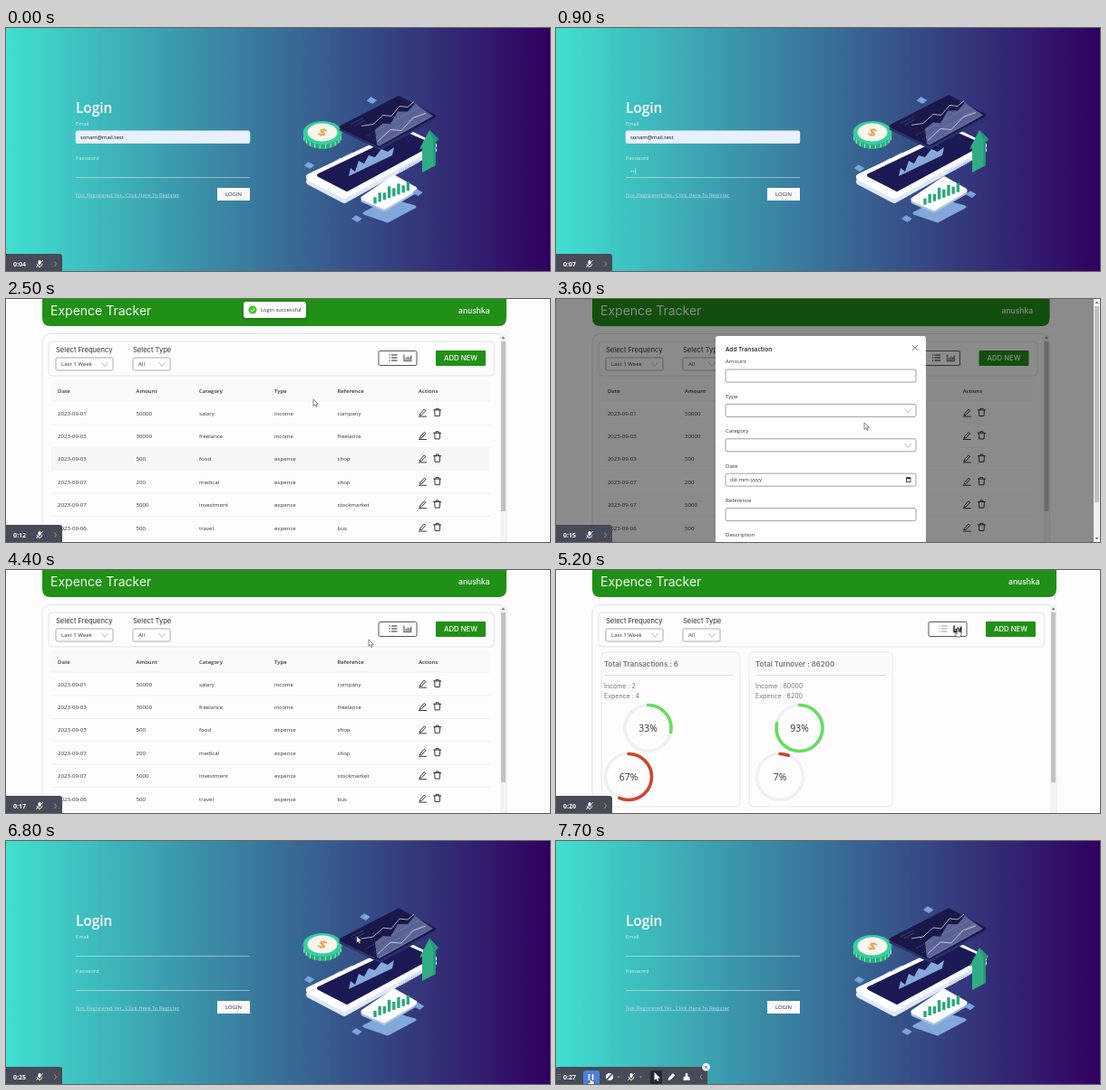
Animation, 600 px wide and 269 px high, one loop 7.8 s. Source, as an HTML page:

```html
<!DOCTYPE html>
<html lang="en">
<head>
<meta charset="utf-8">
<title>Expence Tracker</title>
<style>
html, body { margin: 0; width: 100%; height: 100%; overflow: hidden; }
svg { display: block; width: 100vw; height: 100vh; font-family: 'Open Sans', 'Noto Sans', sans-serif; }
text { white-space: pre; }
.m { font-family: Inter, 'Open Sans', sans-serif; }
</style>
</head>
<body>
<svg id="stage" viewBox="0 0 600 269" preserveAspectRatio="none"></svg>
<script>
const LOOP = 7800, STEP = 100;
const stage = document.getElementById('stage');

// Markup helpers
const text = (x, y, s, size = 6.1, fill = '#333', more = '') =>
  `<text x="${x}" y="${y}" font-size="${size}" fill="${fill}" ${more}>${s}</text>`;
const rect = (x, y, w, h, fill, more = '') =>
  `<rect x="${x}" y="${y}" width="${w}" height="${h}" fill="${fill}" ${more}/>`;
const path = (d, fill, more = '') => `<path d="${d}" fill="${fill}" ${more}/>`;
const line = (d, stroke, width = 1, more = '') =>
  path(d, 'none', `stroke="${stroke}" stroke-width="${width}" ${more}`);
const group = (id, body, more = '') => `<g id="${id}" ${more}>${body}</g>`;
const at = (x, y, body) => `<g transform="translate(${x} ${y})">${body}</g>`;
const range = (n, f) => Array.from({ length: n }, (_, i) => f(i)).join('');
const round = 'stroke-linejoin="round" stroke-linecap="round"';
const mid = 'text-anchor="middle"';
// Filled polygon with rounded corners
const slab = (d, fill, width) => path(d, fill, `stroke="${fill}" stroke-width="${width}" ${round}`);

const tile = id => group(id, slab('M-5 0L-1-3.3L5 0L1 3.3Z', '#7ba5dc', 1));

function artwork() {
  const body = 'M335 165L373 185L471 130L440 115Z';
  const phone =
    at(0, 5, slab(body, '#dfe8f8', 8)) + slab(body, '#fff', 8) +
    slab('M345 163L376 179L468 129L441 117Z', '#1b1a55', 4) +
    path('M378 164L380 155L385 159L389 147L395 150L400 141L407 143L414 134L421 137L428 132L426 141Z', '#86a9dc') +
    line('M434 159L456 147', '#b9cdec', 3, 'stroke-dasharray="1.5 1"') +
    line('M362 148L369 144M372 143L382 138M361 153L366 150', '#b6cbef');
  const screen = 'M369 109L412 130L473 97L433 76Z';
  const panel =
    at(0, 3, slab(screen, '#2b3070', 3)) + slab(screen, '#191848', 3) +
    path('M409 129L407 112L416 105L424 106L432 92L443 92L451 83L471 97L412 130Z', '#8493c4', 'opacity=".62"') +
    line('M392 108L405 106L416 96L425 97L434 86L443 87L450 81M410 125L424 112L436 113L449 99L463 94', '#e6ecff', .7) +
    line('M411 129L468 98M404 124L462 92M397 119L455 88', '#dce8ff', .3, 'stroke-dasharray="1 1.4"') +
    line('M380 106L394 99M384 108L395 102', '#43508f', .7);
  const coin =
    path('M328 116V121A21 13 0 0 0 370 121V116Z', '#27ad7e') +
    range(10, i => {
      const a = .25 + i * .29, x = 349 + 21 * Math.cos(a), y = 117 + 12.5 * Math.sin(a);
      return line(`M${x} ${y}V${y + 4}`, '#b5ead5', 1);
    }) +
    '<ellipse cx="349" cy="116" rx="21.5" ry="13" fill="#36cfa0"/>' +
    '<ellipse cx="349" cy="115.5" rx="16.5" ry="10" fill="#f8f5ec"/>' +
    text(0, 5, '$', 14, '#e3a04a', `${mid} font-weight="700" transform="translate(349 115.5) scale(1.15 .85) rotate(25)"`);
  const face = 'M394 189L417 199L451 179L428 166Z';
  const card =
    at(0, 2.5, slab(face, '#a9c0e4', 5)) + slab(face, '#fff', 5) +
    range(8, i => line(`M${407 + i * 5.2} ${195 - i * 2}v${-[7, 10, 8, 13, 9, 12, 8, 10][i]}`, '#2aa97c', 3.4));
  const arrow =
    path('M467 113L477 123L474 126V152L459 160V133L456 134Z', '#2fae83') +
    path('M467 113L477 123L474 126V152L471.5 153.5V125Z', '#23967a');
  return phone + group('coin', coin) + group('panel', panel) +
    slab('M395 205L423 190L451 198L421 214Z', '#82a8da', 3) +
    group('card', card) + group('arrow', arrow) +
    ['tileA', 'tileB', 'tileC', 'tileD'].map(tile).join('');
}

function login() {
  const pale = 'rgba(255,255,255,.75)';
  const underline = y => line(`M77 ${y}H269`, 'rgba(255,255,255,.55)', .8);
  return rect(0, 0, 600, 269, 'url(#sky)') +
    text(77, 94, 'Login', 15.4, '#fff', 'font-weight="600"') +
    text(77, 107.5, 'Email', 5.7, pale) + underline(127.5) +
    group('filled', rect(76.7, 113.6, 192.6, 14.2, '#e8f0fe', 'rx="3"') + text(82, 123, 'sonam@mail.test', 5.9, '#111')) +
    text(77, 146, 'Password', 5.7, pale) + underline(165.5) +
    group('dots', range(6, i => `<circle cx="${83 + i * 2.6}" cy="158.7" r=".8" fill="#fff" fill-opacity=".85"/>`)) +
    line('M0 155.5V162', '#fff', .6, 'id="caret"') +
    text(77, 186.5, 'Not Registered Yet , Click Here To Register', 5.9, '#b5d9e8', 'text-decoration="underline"') +
    rect(233, 177, 36, 14, '#fafafa') + text(251, 186.3, 'LOGIN', 5.9, '#222', mid) +
    artwork();
}

const chevron = (x, y) => line(`M${x - 3.5} ${y - 2}l3.5 4.5l3.5-4.5`, '#aaa', .8);
const pen = line('M-2.6 1.5L1.7-3.4L3.4-2L-1 2.8L-3 3.2ZM-4 4.6H4', '#222', .9, round);
const bin = line('M-4-2.6H4M-1.5-2.8V-4.2H1.5V-2.8M-3-2.4L-2.6 4H2.6L3-2.4', '#222', .9, round);
const arrowUp = (x, y) => path(`M${x - 2} ${y + 1}h4l-2-2.6Z`, '#777');

// Header and filters; inset is the room taken by the page scrollbar
function frame(inset) {
  const r = x => x - inset, border = 'stroke="#dcdcdc" stroke-width=".8"';
  return rect(0, 0, 600, 269, '#fdfdfd') +
    path(`M40 0H${r(552)}V21Q${r(552)} 30 ${r(543)} 30H49Q40 30 40 21Z`, '#219016') +
    text(49, 18.4, 'Expence Tracker', 14, '#f4fbf2', 'class="m"') +
    text(r(499), 16, 'anushka', 8.6, '#fff', 'class="m" font-weight="500"') +
    rect(40, 38.5, r(512), 250, '#fdfdfd', `rx="9" ${border}`) +
    rect(r(545), 39, 7, 230, '#f3f3f3') + arrowUp(r(548.5), 43) + rect(r(546), 47, 5, 188, '#c1c1c1') +
    rect(47, 47, r(491.5), 38, 'none', `rx="4" ${border}`) +
    text(55, 59, 'Select Frequency', 7.6, '#333', 'class="m"') +
    text(140, 59, 'Select Type', 7.6, '#333', 'class="m"') +
    [[55, 63, 'Last 1 Week'], [140, 41, 'All']].map(([x, w, s]) =>
      rect(x, 65, w, 14, '#fff', 'rx="1.5" stroke="#999" stroke-width=".8"') +
      text(x + 6, 74.2, s) + chevron(x + w - 9, 72)).join('') +
    rect(r(411), 57.5, 42, 16, '#fff', 'rx="1.5" stroke="#444" stroke-width=".9"') +
    rect(r(474), 57, 55, 17, '#219016', 'rx="1"') +
    text(r(501.5), 68.4, 'ADD NEW', 7.7, '#fff', `class="m" font-weight="500" ${mid}`);
}

const toggles = (x, listInk, chartInk) =>
  line(`M${x} 62h1.3M${x} 65h1.3M${x} 68h1.3M${x + 2.6} 62h6.4M${x + 2.6} 65h6.4M${x + 2.6} 68h6.4`, listInk, 1.2) +
  line(`M${x + 16.5} 61.5V68.5H${x + 25}M${x + 18.7} 67.5v-2.5M${x + 20.7} 67.5v-4M${x + 22.7} 67.5v-3M${x + 24.3} 67.5v-5`, chartInk, 1.4);

function list(inset) {
  const heads = ['Date', 'Amount', 'Category', 'Type', 'Reference', 'Actions'];
  const rows = ['01 50000 salary income company', '03 30000 freelance income freelance', '03 500 food expence shop',
    '07 200 medical expence shop', '07 5000 investment expence stockmarket', '06 500 travel expence bus'];
  const col = i => [57, 143.5, 213, 296, 365.5, 455][i] * (1 - inset / 484) + inset * 50 / 484;
  const end = 534 - inset;
  return frame(inset) + toggles(422.5 - inset, '#222', '#777') +
    rect(50, 89, end - 50, 24, '#fafafa') + line(`M50 113H${end}`, '#eee', .7) +
    heads.map((s, i) => text(col(i), 103.5, s, 6, '#333', 'font-weight="600"')).join('') +
    rows.map((row, k) => {
      const y = 126 + k * 25.4;
      const cells = row.split(' ');
      cells[0] = '2023-09-' + cells[0];
      return (k == 2 && !inset ? rect(50, 164.5, end - 50, 25, '#f7f7f7', 'id="hover"') : '') +
        cells.map((s, i) => text(col(i), y + 2.6, s)).join('') +
        at(col(5) + 4.5, y - .5, pen) + at(col(5) + 20.7, y - .5, bin) +
        line(`M50 ${y + 13}H${end}`, '#eee', .7);
    }).join('');
}

const ring = (x, y, p, ink) =>
  `<circle cx="${x}" cy="${y}" r="25.5" fill="none" stroke="#f0f0f2" stroke-width="3.6"/>` +
  `<circle class="ring" data-p="${p}" cx="${x}" cy="${y}" r="25.5" fill="none" stroke="${ink}" stroke-width="3.6"
    stroke-linecap="round" pathLength="100" transform="rotate(-90 ${x} ${y})"/>` +
  text(x, y + 3.8, p + '%', 10.4, '#333', mid);

const summary = (x, w, pad, title, income, expence, p) =>
  rect(x, 91, w, 171, '#fdfdfd', 'rx="4" stroke="#e2e2e2" stroke-width=".8"') +
  rect(x + .5, 91.5, w - 1, 24, '#fafafa', 'rx="3"') +
  text(x + pad, 107, title, 7.9, '#777', 'class="m" font-weight="600"') +
  line(`M${x + pad} 116.5H${x + w - 7}`, '#d5d5d5', .8) +
  text(x + pad, 130.5, 'Income : ' + income, 7, '#777', 'class="m"') +
  text(x + pad, 142.3, 'Expence : ' + expence, 7, '#777', 'class="m"') +
  ring(x + pad + 48.5, 175, p, '#68dc60') + ring(x + pad + 27, 229, 100 - p, '#d0452b');

const charts = () => frame(0) + toggles(422.5, '#999', '#111') +
  summary(50, 153, 3, 'Total Transactions : 6', 2, 4, 33) +
  summary(213, 158, 7, 'Total Turnover : 86200', 80000, 6200, 93);

function dialog() {
  const fields = ['Amount', 'Type', 'Category', 'Date', 'Reference', 'Description'];
  return rect(176, 41, 232, 260, '#fff', 'rx="3"') +
    text(187, 58, 'Add Transaction', 6.6, '#222', 'font-weight="600"') +
    line('M393 51l6 6M399 51l-6 6', '#777', .9) +
    fields.map((s, i) => {
      const y = 78 + i * 38.4;
      return text(187, y - 6.7, s) + rect(187, y, 210, 14, '#fff', 'rx="2" stroke="#888" stroke-width=".8"') +
        (i == 1 || i == 2 ? chevron(388, y + 7) : '');
    }).join('') +
    text(192, 202.3, 'dd-mm-yyyy', 6.1) +
    rect(386.5, 198, 4.5, 4.5, 'none', 'stroke="#222" stroke-width=".8"') + rect(386.5, 197.5, 4.5, 1.7, '#222');
}

const BAR = '#464b57';
const mic = rect(-1.5, -4, 3, 5, '#fff', 'rx="1.5"') +
  line('M-3 0A3 3 0 0 0 3 0M0 3V4.5M-3.8 4L3.8-4', '#fff', .8);
const angle = (x, dir) => line(`M${x - dir} 258.5l${2 * dir} 2.7l${-2 * dir} 2.7`, '#aaa', .8);
const tools = () =>
  rect(0, 250, 167, 22, BAR, 'rx="2"') +
  line('M2.4 258V265M4.4 258V265', '#999', 1, 'stroke-dasharray="1 1.5"') +
  rect(30, 254, 18, 18, '#4a80e0', 'rx="3"') + line('M36.5 258V265M40.5 258V265', '#fff', 1.6) +
  at(59, 261, '<circle r="4" fill="#fff"/>' + line('M-3.6 4L3.6-4', BAR, 1.6)) +
  at(83, 261, mic) +
  [69, 93.5].map(x => path(`M${x - 1.5} 260.5h3l-1.5 2Z`, '#999')).join('') +
  rect(104, 254, 13, 15, '#25282e', 'rx="2"') +
  path('M108.5 256V265L110.6 263L112 266L113.4 265.3L112 262.5H115Z', '#fff') +
  path('M123.5 265L124.3 262L129 257L131.3 259.2L126.5 264.2Z', '#fff') +
  path('M142.8 257h2.4v3.2l2.3 1.5v3.4h-7v-3.4l2.3-1.5Z', '#fff') + angle(160, -1) +
  '<circle cx="165.5" cy="250.3" r="4.3" fill="#fff"/>' + line('M164 248.8l3 3M167 248.8l-3 3', '#333', .8);

stage.innerHTML = `<defs>
  <linearGradient id="sky"><stop stop-color="#40e0d0"/><stop offset="1" stop-color="#300060"/></linearGradient>
  <filter id="soft" x="-30%" y="-60%" width="160%" height="240%"><feDropShadow dx="0" dy="1.5" stdDeviation="2" flood-opacity=".2"/></filter>
  </defs>` +
  group('login', login()) + group('list', list(0)) + group('narrow', list(7.5)) + group('charts', charts()) +
  group('menu', rect(490, 22, 53, 14, '#fff', 'rx="2" filter="url(#soft)"') + text(498, 31.3, 'Logout', 6.1, '#444')) +
  group('toast', rect(262, 3, 69, 18, '#fff', 'rx="3" filter="url(#soft)"') +
    '<circle cx="272" cy="12" r="4.6" fill="#45c932"/>' + line('M269.9 12.1l1.6 1.7l2.8-3.2', '#fff', 1) +
    text(281, 14.3, 'Login successful', 5.9)) +
  group('mask', rect(0, 0, 593, 269, '#000', 'opacity=".45"')) +
  group('pageBar', rect(593, 0, 7, 269, '#f1f1f1') + arrowUp(596.5, 4) + rect(594, 8, 5, 217, '#c1c1c1') +
    path('M594.5 264h4l-2 2.6Z', '#777')) +
  group('dialog', dialog()) +
  group('mini', path('M0 250H59Q62 250 62 253V269H0Z', BAR) + at(37, 261, mic) + angle(54.5, 1)) +
  group('tools', tools()) +
  text(8, 263.6, '', 7, '#fff', 'id="clock" font-weight="700"') +
  group('pointer', path('M0 0V7.4L1.8 5.8L3 8.4L4.2 7.8L3.1 5.3H5.4Z', '#fff', 'stroke="#333" stroke-width=".6"')) +
  group('hand', path('M-.8 0Q0-.9.8 0V3L4 3.8V6.5L3 9H-1.2L-3.2 5.8L-2.3 5L-.8 6Z', '#fff', 'stroke="#222" stroke-width=".6"'));

const $ = id => document.getElementById(id);
const show = (id, on) => $(id).style.opacity = +on;
const move = (id, x, y) => $(id).setAttribute('transform', `translate(${x} ${y})`);
const clamp = v => Math.max(0, Math.min(1, v));
const ease = v => v * v * (3 - 2 * v);
const ramp = (t, from, to) => ease(clamp((t - from) / (to - from)));
const pulse = (t, a, b, c, d) => ramp(t, a, b) - ramp(t, c, d);
const within = (t, a, b) => t >= a && t < b;

// Mouse track: time, x, y
const track = [[1500, 270, 225], [1750, 251, 185], [2000, 251, 185], [2450, 339, 111], [2700, 339, 111],
  [3200, 500, 66], [3400, 500, 66], [3600, 340, 137], [3850, 340, 137], [4100, 396, 54], [4200, 396, 54],
  [4400, 400, 77], [4800, 443, 65], [5300, 443, 65], [5800, 519, 16], [6000, 519, 16], [6300, 508, 29],
  [6550, 508, 29], [7000, 300, 160], [7500, 38, 262], [7800, 38, 262]];

function mouse(t) {
  const i = Math.max(1, track.findIndex(p => p[0] > t));
  const [t0, x0, y0] = track[i - 1], [t1, x1, y1] = track[i];
  const k = ramp(t, t0, t1);
  return [x0 + (x1 - x0) * k, y0 + (y1 - y0) * k];
}

function draw(t) {
  const inApp = within(t, 2000, 6700);
  const modal = pulse(t, 3300, 3500, 4100, 4300);
  show('login', !inApp);
  show('list', inApp && t < 5000 && !modal);
  show('narrow', modal > 0);
  show('charts', inApp && t >= 5000);

  // Login form and floating artwork
  show('filled', t < 2000);
  const typed = t < 2000 ? Math.max(0, Math.min(6, Math.floor((t - 660) / 120))) : 0;
  [...$('dots').children].forEach((dot, i) => dot.style.opacity = +(i < typed));
  show('caret', within(t, 600, 1700) && t % 400 < 200);
  move('caret', 82.5 + typed * 2.6, 0);
  const a = t * 2 * Math.PI / 1800, s = Math.sin(a), c = Math.cos(a);
  move('coin', 0, s);
  move('panel', 0, .5 * c);
  move('card', 0, -.7 * c);
  move('arrow', 0, 5 * s);
  move('tileA', 403.5 + 7.5 * s, 80 - 4 * s);
  move('tileB', 334.5, 153.5 - 1.5 * c);
  move('tileC', 387, 211);
  move('tileD', 456 - 2 * c, 183 - c);

  // Dashboard
  show('hover', 1 - ramp(t, 2500, 2700));
  const toast = pulse(t, 2000, 2200, 2950, 3150);
  show('toast', toast);
  move('toast', 0, -10 * (1 - toast));
  const grow = ramp(t, 4900, 5300);
  document.querySelectorAll('.ring').forEach(r => r.setAttribute('stroke-dasharray', `${r.dataset.p * grow} 200`));
  show('menu', within(t, 5800, 6700) ? .15 + .85 * ramp(t, 5900, 6100) : 0);
  show('mask', modal);
  show('pageBar', modal > 0);
  show('dialog', modal);
  $('dialog').setAttribute('transform', `translate(500 66) scale(${.2 + .8 * modal}) translate(-500 -66)`);

  // Recorder and mouse
  $('clock').textContent = '0:' + String(Math.floor(4.6 + t * .003)).padStart(2, '0');
  show('tools', t >= 7500);
  show('mini', t < 7500);
  const [x, y] = mouse(t);
  const press = within(t, 1700, 2000) || within(t, 3150, 3400) || within(t, 4750, 5350) ||
    within(t, 5750, 6600) || t >= 7450;
  show('pointer', t >= 1500 && !press);
  show('hand', press);
  move('pointer', x, y);
  move('hand', x, y);
}

const start = performance.now();
function play(now) {
  const t = Math.max(0, now - start) % LOOP;
  draw(Math.floor(t / STEP) * STEP);
  requestAnimationFrame(play);
}
play(start);
</script>
</body>
</html>
```
